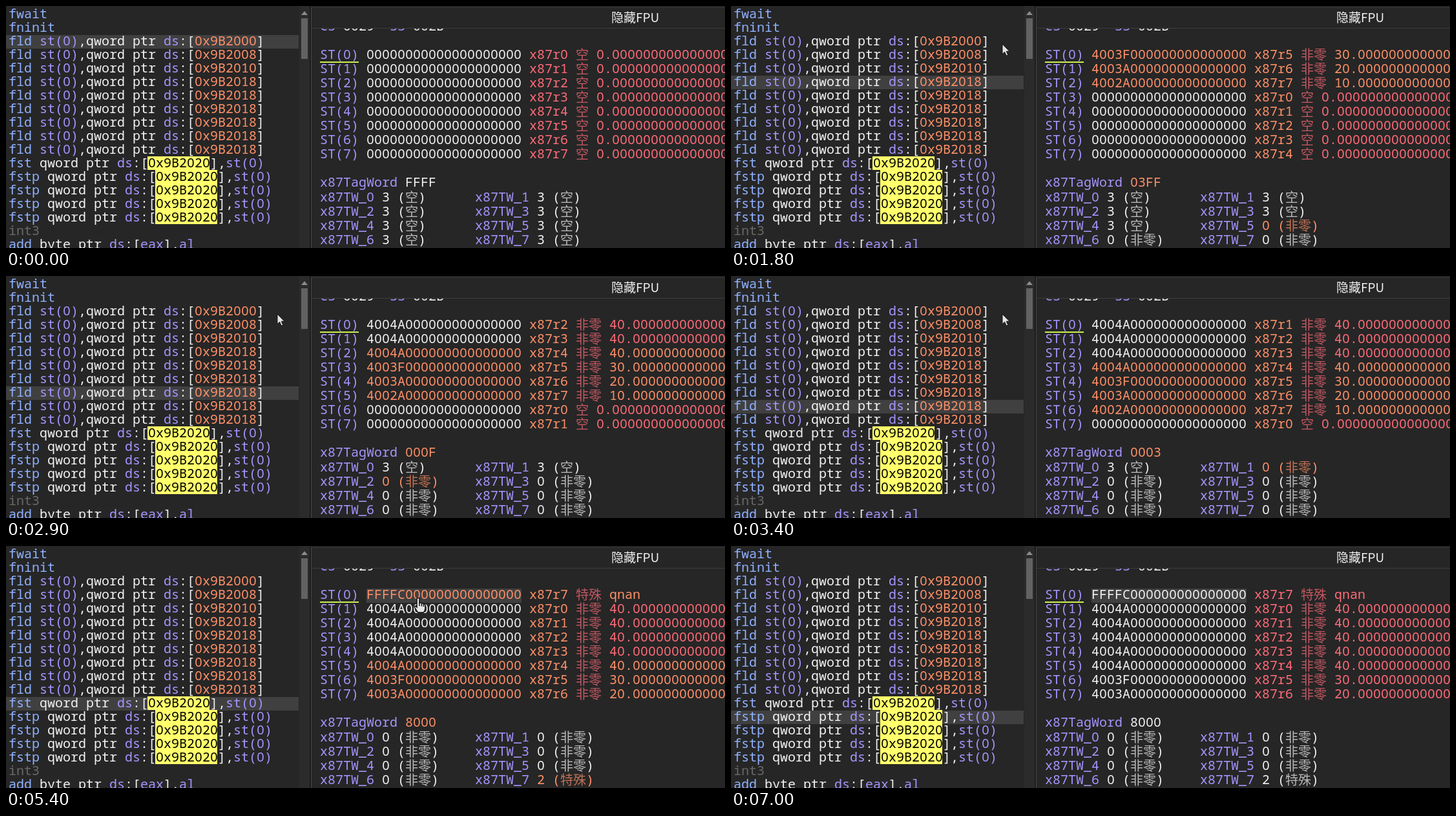
These frames come from a looping animation (1113 by 375 pixels, 7.5 s). An HTML page with a canvas:

```html
<!DOCTYPE html>
<html lang="zh-CN">
<head>
<meta charset="utf-8">
<title>FPU</title>
<style>
html, body { margin: 0; width: 100%; height: 100%; overflow: hidden; background: #262626; }
canvas { display: block; }
</style>
</head>
<body>
<canvas id="stage" width="1113" height="375"></canvas>
<script>
const ctx = document.getElementById('stage').getContext('2d');
const W = 1113, H = 375, LOOP = 7500, CH = 12, WIDE = 20;
const MONO = '20px "Noto Sans Mono", monospace';
const ZERO = '20px "Noto Sans", sans-serif';
const HAN = '300 20px "Noto Sans CJK SC", "Noto Sans CJK", sans-serif';
const BG = '#262626', ROW = '#404040', WHITE = '#f2f2f2', BLUE = '#8fb0ff', PURPLE = '#a794ff',
  ORANGE = '#ff9068', RED = '#ff6b78', YELLOW = '#ffff6b', GREY = '#686868';

// Times at which the debugger steps to the next instruction
const STEPS = [1100, 1500, 1800, 2200, 2600, 2900, 3400, 4000, 4500, 7000];
const LOADS = [10, 20, 30, 40, 40, 40, 40, 40, 'qnan'];
const HEX = { 0: '0', 10: '4002A', 20: '4003A', 30: '4003F', 40: '4004A', qnan: 'FFFFC' };
const TAGS = { 0: '非零', 2: '特殊', 3: '空' };
const OFFSETS = ['2000', '2008', '2010', ...Array(6).fill('2018')];

function rect(x, y, w, h, color) {
  ctx.fillStyle = color;
  ctx.fillRect(x, y, w, h);
}

// Writes on a fixed character grid and returns the end position
function put(text, x, base, color) {
  ctx.fillStyle = color;
  ctx.textAlign = 'center';
  for (const c of text) {
    const han = c > '\u2fff', w = han ? WIDE : CH;
    ctx.font = han ? HAN : c === '0' ? ZERO : MONO;
    ctx.globalAlpha = han ? 0.72 : 1;
    if (c !== ' ') ctx.fillText(c, x + w / 2, base + (han ? 1 : 0));
    x += w;
  }
  ctx.globalAlpha = 1;
  return x;
}

function runs(x, base, ...parts) {
  for (const [text, color] of parts) x = put(text, x, base, color);
  return x;
}

// Registers after a number of loads; the ninth overflows the stack
function fpu(loads) {
  const tags = Array(8).fill(3), st = Array(8).fill(0);
  for (let i = 0; i < loads; i++) {
    tags[(15 - i) % 8] = LOADS[i] === 'qnan' ? 2 : 0;
    st.unshift(LOADS[i]);
    st.pop();
  }
  const word = tags.reduce((sum, t, i) => sum + t * 4 ** i, 0);
  return { tags, st, top: (16 - loads) % 8, word: word.toString(16).toUpperCase().padStart(4, '0') };
}

function drawCode(step) {
  rect(0, 3 + 21 * (step + 2), 453, 21, ROW);
  const base = row => 19 + 21 * row;
  put('fwait', 4, base(0), BLUE);
  put('fninit', 4, base(1), BLUE);
  OFFSETS.forEach((offset, i) => runs(4, base(i + 2),
    ['fld ', BLUE], ['st(0)', PURPLE], [',qword ptr ', WHITE], ['ds', PURPLE],
    [':[', WHITE], ['0x9B' + offset, ORANGE], [']', WHITE]));
  for (let row = 11; row < 16; row++) {
    const x = runs(4, base(row), [row === 11 ? 'fst ' : 'fstp ', BLUE],
      ['qword ptr ', WHITE], ['ds', PURPLE], [':[', WHITE]);
    rect(x - 1, 2 + 21 * row, 96, 21, YELLOW);
    runs(x, base(row), ['0x9B2020', '#000'], ['],', WHITE], ['st(0)', PURPLE]);
  }
  put('int3', 4, base(16), GREY);
  runs(4, base(17), ['add ', BLUE], ['byte ptr ', WHITE], ['ds', PURPLE], [':[', WHITE],
    ['eax', PURPLE], ['],', WHITE], ['al', PURPLE]);
}

function drawFrame() {
  rect(454, 0, 16, H, '#2b2b2b');
  rect(457, 19, 10, 63, '#626262');
  ctx.fillStyle = '#8c8c8c';
  ctx.beginPath();
  ctx.moveTo(457, 14);
  ctx.lineTo(462, 8);
  ctx.lineTo(467, 14);
  ctx.fill();
  rect(470, 0, 2, H, '#1a1a1a');
  rect(472, 2, 1, H, '#4a4a4a');
  rect(473, 0, W, 34, BG);
  rect(473, 2, W, 1, '#343434');
  rect(473, 34, W, 1, '#3c3c3c');
  ctx.font = '19px "Noto Sans CJK SC", "Noto Sans CJK", sans-serif';
  ctx.textAlign = 'center';
  ctx.fillStyle = WHITE;
  ctx.fillText('隐藏FPU', 974, 25);
}

function drawRegisters(step, selected) {
  const now = fpu(Math.min(step, 9)), old = fpu(Math.min(Math.max(step - 1, 0), 9));
  const tint = (changed, plain) => changed ? ORANGE : plain;
  runs(486, 38, ['CS ', PURPLE], ['0029  ', WHITE], ['SS ', PURPLE], ['002B', WHITE]);
  if (selected) rect(558, 66, 240, 22, ROW);
  now.st.forEach((value, i) => {
    const reg = (now.top + i) % 8, changed = value !== old.st[i];
    const number = value === 'qnan' ? value : value.toFixed(18);
    runs(486, 82 + 22 * i, [`ST(${i}) `, PURPLE],
      [HEX[value].padEnd(20, '0') + ' ', tint(changed, WHITE)],
      [`x87r${reg} `, tint(now.top !== old.top, RED)],
      [TAGS[now.tags[reg]] + ' ', RED],
      [number, tint(changed, RED)]);
  });
  rect(486, 86, 60, 2, '#c8f050');
  runs(486, 280, ['x87TagWord ', PURPLE], [now.word, tint(now.word !== old.word, WHITE)]);
  now.tags.forEach((tag, i) => runs(486 + 240 * (i % 2), 303 + 22 * (i >> 1),
    [`x87TW_${i} `, PURPLE], [`${tag} (${TAGS[tag]})`, tint(tag !== old.tags[i], WHITE)]));
}

// The pointer is sampled ten times a second
function pointer(time) {
  const t = Math.floor(time / 100) * 100;
  if (t < 100 || t >= 6300) return null;
  if (t < 700) {
    const rest = (1 - (t - 100) / 600) ** 2;
    return [420 + 388 * rest, 59 + 271 * rest];
  }
  if (t < 5100) return [420, 59];
  if (t < 5400) {
    const p = (t - 5000) / 400, e = p * p * (3 - 2 * p);
    return [420 + 218 * e, 59 + 21 * e];
  }
  if (t < 5900) return [638, 80];
  return t < 6200 ? [644, 80] : [694, 100];
}

const ARROW = new Path2D('M0 0V15.5L3.6 12.2L6.2 18L8.8 16.9L6.3 11.2H11Z');
const HAND = new Path2D('M-2 1.5Q0 -.5 2 1.5V8Q4 7 5.5 9Q7.5 8 8.5 10Q11 9.5 11 12V17' +
  'Q10.5 20 8.5 23H-.5L-5 16Q-6.5 13 -4 13L-2 15Z');
const FINGERS = new Path2D('M2 8V13M5.5 9V13.5M8.5 10V14');

function drawPointer([x, y]) {
  const hand = x > 558 && x < 798 && y > 66 && y < 242;
  ctx.save();
  ctx.translate(x, y);
  ctx.fillStyle = '#e4e4e4';
  ctx.strokeStyle = '#111';
  ctx.lineWidth = hand ? 1.5 : 1;
  ctx.fill(hand ? HAND : ARROW);
  ctx.stroke(hand ? HAND : ARROW);
  if (hand) ctx.stroke(FINGERS);
  ctx.restore();
}

function draw(ms) {
  const t = ms % LOOP;
  const step = STEPS.filter(s => t >= s).length;
  const at = pointer(t);
  rect(0, 0, W, H, BG);
  drawCode(step);
  drawRegisters(step, t >= 5400);
  drawFrame();
  if (at) drawPointer(at);
}

const start = performance.now();
function tick() {
  draw(performance.now() - start);
  requestAnimationFrame(tick);
}
tick();
</script>
</body>
</html>
```
